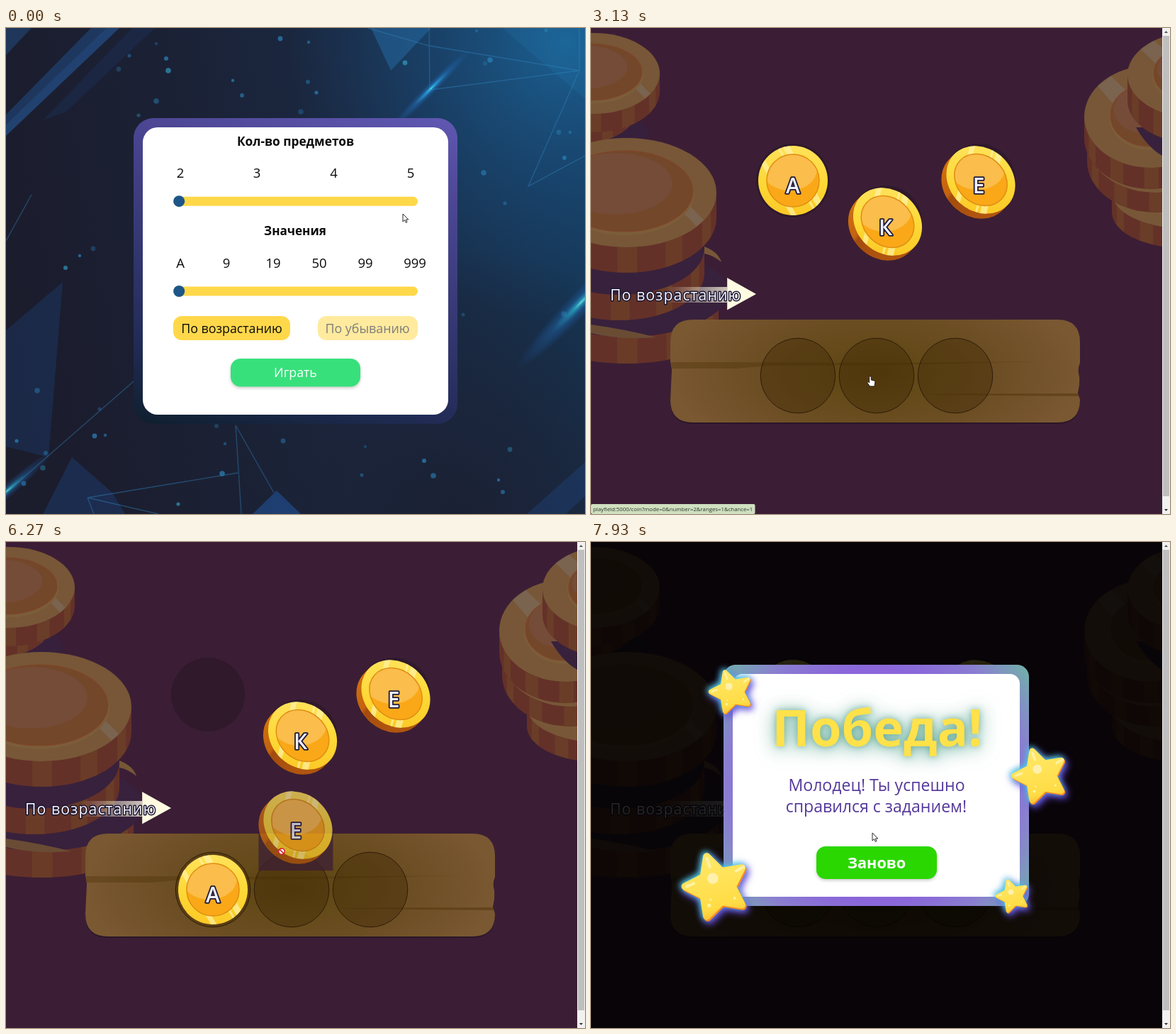
An HTML page that plays this animation: 817x685 px, repeating every 8 s.

```html
<!DOCTYPE html>
<html lang="ru">
<head>
<meta charset="utf-8">
<title>Игра с монетами</title>
<style>
html, body { margin: 0; width: 100%; height: 100%; overflow: hidden; background: #1b2135; }
svg { display: block; width: 817px; height: 685px; }
text { font-family: "Open Sans", "Noto Sans", sans-serif; }
.bold { font-weight: 700; }
.letter { font: 600 30px "Open Sans", "Noto Sans", sans-serif; fill: #eef0ff; stroke: #1d1a38; stroke-width: 3.6; paint-order: stroke; stroke-linejoin: round; text-anchor: middle; }
.win { filter: drop-shadow(0 0 5px rgba(20,120,95,.45)) drop-shadow(0 3px 13px rgba(20,130,100,.65)); }
.star { filter: drop-shadow(-2px -2px 4px #49d8e4) drop-shadow(3px 4px 5px #6647dc); }
.press { filter: drop-shadow(0 2px 2px rgba(0,0,0,.22)); }
</style>
</head>
<body>
<svg id="stage" viewBox="0 0 817 685" xmlns="http://www.w3.org/2000/svg"></svg>
<script>
const stage = document.getElementById('stage');

// markup helpers
const rect = (x, y, w, h, r, fill, more = '') =>
  `<rect x="${x}" y="${y}" width="${w}" height="${h}" rx="${r}" fill="${fill}" ${more}/>`;
const oval = (x, y, rx, ry, fill, more = '') =>
  `<ellipse cx="${x}" cy="${y}" rx="${rx}" ry="${ry}" fill="${fill}" ${more}/>`;
const path = (d, fill, more = '') => `<path d="${d}" fill="${fill}" ${more}/>`;
const label = (s, x, y, size, fill = '#0b0b0b', more = '') =>
  `<text x="${x}" y="${y}" font-size="${size}" fill="${fill}" text-anchor="middle" ${more}>${s}</text>`;
const stops = list => list.map(([o, c, a = 1]) => `<stop offset="${o}" stop-color="${c}" stop-opacity="${a}"/>`).join('');
const linear = (id, x1, y1, x2, y2, list) =>
  `<linearGradient id="${id}" gradientUnits="userSpaceOnUse" x1="${x1}" y1="${y1}" x2="${x2}" y2="${y2}">${stops(list)}</linearGradient>`;
const radial = (id, x, y, r, list, more = '') =>
  `<radialGradient id="${id}" gradientUnits="userSpaceOnUse" cx="${x}" cy="${y}" r="${r}" ${more}>${stops(list)}</radialGradient>`;

const homes = { A: [285, 215], K: [415.5, 274], E: [547, 215] };
const letters = { A: 'А', K: 'К', E: 'Е' };
const names = Object.keys(homes);
const slots = [[292, 490], [403, 490], [514, 490]];

// shine: angle of the pale streaks across the rim
function coinFace(id, x, y, rx, ry, irx, iry, turn, shine) {
  const spin = `transform="translate(${x} ${y}) rotate(${turn})"`;
  return `<clipPath id="${id}Rim"><ellipse rx="${rx}" ry="${ry}" ${spin}/></clipPath>
    <clipPath id="${id}In"><ellipse rx="${irx}" ry="${iry}" ${spin}/></clipPath>
    <g clip-path="url(#${id}Rim)">
      ${rect(-60, -60, 120, 120, 0, 'url(#gold)')}
      <g fill="#fff3a6" opacity=".7" transform="translate(${x} ${y}) rotate(${shine})">
        ${rect(-60, -20, 120, 9, 0, '#fff3a6')}${rect(-60, -7, 120, 3, 0, '#fff3a6')}${rect(-60, 20, 120, 7, 0, '#fff3a6')}
      </g>
    </g>
    <g ${spin}>${oval(0, 0, irx, iry, '#faa817')}</g>
    <g clip-path="url(#${id}In)">${oval(x - 5, y - 16, 39, 30, '#fbbd4b')}</g>
    <g ${spin}>${oval(0, 0, irx, iry, 'none', 'stroke="#e08d14" stroke-width="1.5"')}</g>`;
}

function tiltedCoin() {
  let side = '';
  for (let i = 7; i >= 1; i--) side += oval(3 - i, i - 1, 52, 44, 'url(#edge)', `transform="rotate(42 ${3 - i} ${i - 1})"`);
  return side + coinFace('tilt', 3, -1, 52, 44, 40, 33.5, 42, 105);
}

function starShape() {
  let d = '';
  for (let i = 0; i < 10; i++) {
    const a = Math.PI * (1 + i / 5), r = i % 2 ? 22 : 43;
    d += `${i ? 'L' : 'M'}${(r * Math.cos(a)).toFixed(1)} ${(r * Math.sin(a)).toFixed(1)}`;
  }
  d += 'Z';
  return path(d, '#f58a24', 'stroke="#f58a24" stroke-width="10" stroke-linejoin="round" transform="translate(1.5 2)"') +
    path(d, 'url(#starG)', 'stroke="url(#starG)" stroke-width="10" stroke-linejoin="round"') +
    oval(-5, -11, 7.5, 7.5, '#fff', 'opacity=".5"') +
    path('M-13 -38L-9 -27M37 -27L27 -21M-41 0L-31 -4', 'none', 'stroke="#fff6b5" stroke-width="4" stroke-linecap="round" opacity=".8"') +
    oval(-10, 26, 2.5, 2.5, '#fff3a0') + oval(25, 16, 2, 2, '#fff3a0') + oval(-8, 18, 1.5, 1.5, '#fff3a0');
}

const coinArt = n => `<g id="art${n}"><use href="#${n == 'A' ? 'flat' : 'slanted'}"/><text class="letter" y="18">${letters[n]}</text></g>`;

const defs = `<defs>
  ${linear('night', 0, 400, 817, 240, [[0, '#1b1c2c'], [.35, '#1b2135'], [.65, '#1a2942'], [1, '#153756']])}
  ${radial('glowTop', 790, 20, 390, [[0, '#1d6aa0', .8], [.45, '#1b5588', .5], [1, '#1b4c80', 0]])}
  ${radial('shadeLow', 640, 690, 380, [[0, '#1b2033', .95], [.4, '#1b2236', .7], [1, '#1b2236', 0]])}
  ${linear('frame', 180, 558, 317, 42, [[0, '#0f1f2d'], [.22, '#222c57'], [.78, '#4c4694'], [1, '#6058b3']])}
  ${radial('flareG', 0, 0, 1, [[0, '#7ffcf0'], [.12, '#2bb6d6', .85], [.45, '#2277c8', .4], [1, '#2066c0', 0]])}
  ${linear('gold', 0, -50, 0, 50, [[0, '#ffe25a'], [.55, '#fdd835'], [1, '#fcc826']])}
  ${linear('edge', -45, 0, 20, 50, [[0, '#d0700f'], [.55, '#c4620f'], [.62, '#a34b0e'], [1, '#b0550f']])}
  ${radial('wood', 401, 486, 290, [[0, '#5c4110'], [.3, '#654a1a'], [.65, '#6e4f26'], [1, '#7a5832']], 'gradientTransform="translate(0 253) scale(1 .48)"')}
  ${linear('shaft', 105, 0, 233, 0, [[0, '#fffbe2', 0], [.68, '#e8e0d0', .85], [.69, '#fffbe2'], [1, '#fffbe2']])}
  ${radial('prize', 402, 343, 275, [[0, '#8a63da'], [.6, '#8a66da'], [.78, '#8a7fd0'], [1, '#6fb5a6']])}
  ${linear('starG', 0, -40, 18, 48, [[0, '#ffe766'], [.75, '#ffdc45'], [1, '#fbb52f']])}
  <g id="flat">${coinFace('flat', 0, 0, 49, 49, 37, 37, 0, 60)}</g>
  <g id="slanted">${tiltedCoin()}</g>
  <g id="star">${starShape()}</g>
  ${names.map(coinArt).join('')}
</defs>`;

const flare = (x, y, len, thick, turn, alpha = 1) =>
  `<ellipse rx="1" ry="1" fill="url(#flareG)" opacity="${alpha}" transform="translate(${x} ${y}) rotate(${turn}) scale(${len} ${thick})"/>`;

function menuScene() {
  const dots = [212, 22, 226, 43, 229, 60, 174, 39, 159, 58, 320, 74, 333, 95, 212, 103, 187, 123, 387, 15, 427, 20, 426, 76,
    416, 118, 438, 91, 563, 49, 664, 4, 676, 50, 683, 45, 762, 3, 780, 147, 796, 147, 788, 183, 674, 204, 704, 247,
    123, 311, 104, 321, 84, 338, 44, 511, 132, 537, 125, 575, 140, 574, 56, 599, 52, 620, 15, 582, 25, 642, 309, 586,
    297, 561, 305, 628, 243, 671, 391, 582, 507, 590, 590, 610, 603, 631, 502, 630, 711, 594, 695, 637, 701, 654, 787, 403, 645, 404];
  let spots = '';
  for (let i = 0; i < dots.length; i += 2) {
    const k = i / 2, r = 2.2 + k * 7 % 5 * .4;
    spots += oval(dots[i], dots[i + 1], r, r, k % 6 == 2 ? '#35aad0' : '#2a7fb5', `opacity="${.35 + k * 3 % 4 * .13}"`);
  }
  const track = y => rect(236, y - 6.5, 345, 13, 6.5, '#ffd84a');
  const row = (words, xs, y) => words.map((w, i) => label(w, xs[i], y, 18.5)).join('');
  return rect(0, 0, 817, 685, 0, 'url(#night)') + rect(0, 0, 817, 685, 0, 'url(#glowTop)') + rect(0, 300, 817, 385, 0, 'url(#shadeLow)') +
    path('M0 122L120 0H160L0 152Z', '#22518c', 'opacity=".5"') +
    path('M0 136L142 0H160L0 152Z', '#2a62a4', 'opacity=".25"') +
    path('M0 38V0H36Z', '#24568f', 'opacity=".45"') +
    path('M52 130L178 0H210L85 118Z', '#1c3563', 'opacity=".35"') +
    path('M515 0L543 60L600 0Z', '#2671ad', 'opacity=".45"') +
    path('M700 0L817 100V0Z', '#2180b4', 'opacity=".18"') +
    path('M0 426L80 358L60 605L0 590Z', '#1b4073', 'opacity=".38"') +
    path('M93 605L150 655L168 685H52Z', '#1e4480', 'opacity=".4"') +
    path('M382 652L416 685H348Z', '#2456a0', 'opacity=".55"') +
    path('M817 612L735 685H790L817 660Z', '#20457e', 'opacity=".4"') +
    path('M597 0L598 88M510 0L597 25L809 60M809 0V60L737 223L817 180M809 60L600 87M0 300L36 235M0 655L180 498M115 662L327 627M324 560L332 685M324 560L378 655M115 662L124 685M115 662L215 685',
      'none', 'stroke="#3289c4" stroke-width="1.3" opacity=".42"') +
    spots + flare(600, 85, 78, 8, -45) + flare(600, 85, 26, 4, -45) + flare(812, 386, 130, 17, -46, .85) + flare(2, 652, 85, 10, -41, .8) +
    rect(180, 127, 457, 431, 28, 'url(#frame)') + rect(193, 140, 431, 405, 21, '#fff') +
    label('Кол-во предметов', 408.5, 166, 17.3, '#0b0b0b', 'class="bold"') +
    row(['2', '3', '4', '5'], [246, 354, 462.5, 571], 211) + track(244.3) +
    label('Значения', 408, 292, 17.1, '#0b0b0b', 'class="bold"') +
    row(['А', '9', '19', '50', '99', '999'], [246, 311, 377, 442, 507, 577], 337.5) + track(371) +
    `<circle id="knob" cy="244.2" r="8" fill="#1d5688"/>` + oval(244.2, 371, 8, 8, '#1d5688') +
    rect(236, 406, 165, 34, 12, '#ffd84a') + label('По возрастанию', 318.5, 429.5, 17.8) +
    `<g opacity=".53">${rect(440, 406, 141, 34, 12, '#ffd84a')}${label('По убыванию', 510, 429.5, 17.8)}</g>` +
    rect(317, 466, 183, 39.5, 14, '#38e07b', 'class="press"') + label('Играть', 408.5, 492, 17.8, '#fff');
}

// one dimmed coin of the background piles; without irx its face lies in shadow
function slab(x, y, rx, ry, h, irx, iry) {
  const at = a => `${x + rx * Math.sin(a)} ${y + ry * Math.cos(a)}`;
  const side = `M${x - rx} ${y}v${h}a${rx} ${ry} 0 0 0 ${2 * rx} 0v${-h}z`;
  let ribs = '';
  for (let a = -1.2; a < 1.3; a += .55)
    ribs += path(`M${at(a)}L${at(a + .22)}v${h}L${at(a)}v${h}z`.replace(/L([^Lv]+)v([\d.]+)z$/, (m, p, d) => {
      const [px, py] = p.split(' ').map(Number);
      return `L${px} ${py + +d}z`;
    }), '#6c4128', 'opacity=".75"');
  let out = path(side, '#643128') + ribs + oval(x, y, rx, ry, irx ? '#775737' : '#38213c');
  if (irx) {
    out += path(`M${x + rx * .62} ${y + ry * .1}L${x + rx * .86} ${y + ry * .5}L${x + rx * .78} ${y + ry * .62}L${x + rx * .54} ${y + ry * .22}zM${x - rx * .8} ${y - ry * .6}L${x - rx * .6} ${y - ry * .8}L${x - rx * .2} ${y - ry * .3}L${x - rx * .4} ${y}z`, '#7d685a', 'opacity=".7"') +
      oval(x - 3, y + 1, irx + 2, iry + 2, '#7b5d39') +
      oval(x - 3, y - 2, irx, iry, '#734729', 'stroke="#80452b" stroke-width="1.2"') +
      oval(x - irx * .15, y - iry * .22, irx * .82, iry * .76, '#754c38');
  }
  return out;
}

function gameScene() {
  const holes = Object.values(homes).map(([x, y]) => oval(x, y, 52, 52, '#2f192b')).join('');
  const cups = slots.map(([x, y]) => oval(x, y, 52.8, 52.8, '#3a2100', 'fill-opacity=".34" stroke="#2e1c08" stroke-width="1"')).join('');
  const board = 'M144 411H658Q690 411 690 443V472Q686 482 689 491Q690 503 687 514L690 524Q690 556 658 556H144Q112 556 112 524L114 482L112 470V443Q112 411 144 411Z';
  const coin = n => `<use id="coin${n}" href="#art${n}"/>`;
  const ghost = n => `<g id="ghost${n}" opacity=".74">${rect(-52.5, -52, 105, 115, 0, '#3b1e35')}<use href="#art${n}"/></g>`;
  return rect(0, 0, 817, 685, 0, '#3b1e35') +
    path('M62 120L84 150L70 160H0V130Z', '#37203c') +
    slab(-20, 95, 82, 45, 24) + slab(3, 64, 94, 57, 26, 72, 40) +
    slab(50, 385, 130, 50, 38) + oval(60, 372, 133, 60, '#38213c') +
    path('M0 418Q50 425 92 436Q40 440 0 430Z', '#6a4c35') + path('M160 308Q180 316 184 330Q172 320 160 318Z', '#775737') +
    slab(40, 310, 120, 66, 36) + slab(50, 232, 127, 77, 36, 97, 57) +
    slab(835, 232, 100, 50, 28, 60, 30) + slab(797, 160, 97, 72, 28, 56, 44) +
    slab(790, 125, 94, 72, 30, 54, 44) + path('M769 140Q785 168 806 180V140Z', '#38213c') +
    slab(850, 66, 93, 60, 36, 53, 38) + holes +
    path('M105 365H192V352L233 375L192 397.5V387H105Z', 'url(#shaft)') +
    `<text x="27" y="384" font-size="21.2" letter-spacing="1.1" fill="#f6f4ff" stroke="#1b1730" stroke-width="3" paint-order="stroke" stroke-linejoin="round">По возрастанию</text>` +
    path(board, '#1d0f1c', 'opacity=".5" transform="translate(0 2)"') + path(board, 'url(#wood)') +
    path('M113 471H205L420 472L640 470L420 475L250 476L205 480H114Z', '#4e3308', 'opacity=".4"') +
    path('M455 516L688 515V519L580 518Z', '#4e3308', 'opacity=".5"') +
    cups + names.map(coin).join('') + names.map(ghost).join('');
}

function winScene() {
  const star = (x, y, s) => `<g class="star"><use href="#star" transform="translate(${x} ${y}) scale(${s})"/></g>`;
  return rect(0, 0, 806, 685, 0, '#000', 'opacity=".85"') +
    rect(187, 173, 431, 340, 17, 'url(#prize)') + rect(200, 186, 405, 314, 14, '#fff') +
    label('Победа!', 404, 288, 72, '#ffe14a', 'class="bold win"') +
    label('Молодец! Ты успешно', 403, 351, 23.1, '#55399a') +
    label('справился с заданием!', 402.5, 381, 23.1, '#55399a') +
    rect(318, 429, 170, 46, 13, '#2bd700', 'class="press"') + label('Заново', 403, 460, 21.7, '#fff', 'class="bold"') +
    star(198, 211, .67) + star(634, 329.5, .85) + star(177, 485.5, 1.03) + star(595, 499, .51);
}

const bar = rect(806, 0, 11, 685, 0, '#f1f1f1') + rect(807, 11, 9, 649, 0, '#bfbfbf') +
  path('M809 7L811.5 4L814 7Z', '#555') + path('M809 678L811.5 681L814 678Z', '#333');

const arrow = 'M0 0V11L2.6 8.6L4.3 12.4L6 11.6L4.4 8H7.8Z';
const ink = 'stroke="#111" stroke-width=".9" stroke-linejoin="round"';
const pointers = {
  arrow: path(arrow, '#fff', ink),
  resize: path('M-7 0L-3.5 -3.5V-1.2H3.5V-3.5L7 0L3.5 3.5V1.2H-3.5V3.5Z', '#fff', ink),
  hand: path('M0 0C1 0 1.3 .6 1.3 1.4V5L6 6.2C7 6.6 7 7.5 6.8 9L6 14H-.5L-4 9.2C-4.4 8.2 -3 7.4 -2.2 8.2L-1.3 9V1.4C-1.3 .6 -1 0 0 0Z', '#fff', ink),
  copy: path(arrow, '#fff', ink) + rect(6.5, 12, 6, 6, 0, '#fff', ink) + path('M8 15H11M9.5 13.5V16.5', 'none', 'stroke="#111" stroke-width=".8"'),
  banned: oval(0, 0, 4.2, 4.2, '#fff', 'stroke="#d3202f" stroke-width="1.5"') + path('M-3 -3L3 3', 'none', 'stroke="#d3202f" stroke-width="1.5"')
};

stage.innerHTML = defs + `<g id="menu">${menuScene()}</g><g id="game">${gameScene()}</g><g id="win">${winScene()}</g><g id="bar">${bar}</g>` +
  `<g id="status">${rect(0, 671, 231.5, 14, 2, '#cfe0c0')}<text x="3" y="681" font-size="7.8" fill="#2c3328">playfield:5000/coin?mode=0&amp;number=2&amp;ranges=1&amp;chance=1</text></g>` +
  Object.entries(pointers).map(([k, art]) => `<g id="p-${k}">${art}</g>`).join('');

const el = id => document.getElementById(id);
const show = (id, on) => { el(id).style.display = on ? '' : 'none'; };
const move = (id, x, y) => el(id).setAttribute('transform', `translate(${x} ${y})`);

// pointer path: time, x, y
const trail = [
  [0, 560, 262], [330, 330, 335], [470, 242, 352], [600, 297, 360], [733, 297, 360],
  [1000, 325, 320], [1270, 350, 268], [1467, 382, 244], [1600, 453, 244],
  [1867, 385, 244], [2067, 371, 244], [2200, 371, 244], [2400, 478, 355], [2600, 394, 491], [3333, 394, 491],
  [3600, 540, 440], [3800, 589, 330], [4000, 440, 262], [4200, 314, 241], [4333, 301, 238], [4467, 301, 238],
  [4600, 287, 241], [4733, 287, 241], [5200, 285, 447], [5333, 284, 490], [5600, 420, 500],
  [5800, 600, 400], [5900, 625, 300], [6033, 527, 251], [6067, 527, 251], [6267, 389, 436], [6467, 392, 492], [6533, 392, 492],
  [6733, 480, 380], [6933, 405, 275], [7000, 405, 275], [7333, 499, 497], [7600, 499, 497],
  [7733, 524, 468], [7933, 397, 410], [8000, 397, 410]
];

function slope(i, axis) {
  const a = trail[i - 1], b = trail[i], c = trail[i + 1];
  if (!a || !c || (a[1] == b[1] && a[2] == b[2]) || (b[1] == c[1] && b[2] == c[2])) return 0;
  return (c[axis] - a[axis]) / (c[0] - a[0]);
}

function pointerAt(t) {
  let i = trail.findIndex(k => k[0] > t) - 1;
  if (i < 0) i = trail.length - 2;
  const a = trail[i], b = trail[i + 1], d = b[0] - a[0], u = (t - a[0]) / d, v = 1 - u;
  return [1, 2].map(n => a[n] * (1 + 2 * u) * v * v + slope(i, n) * d * u * v * v +
    b[n] * u * u * (3 - 2 * u) - slope(i + 1, n) * d * u * u * v);
}

const drags = [
  { name: 'A', from: 4740, to: 5390, grab: [287, 241], slot: 0 },
  { name: 'E', from: 6070, to: 6590, grab: [527, 251], slot: 1 },
  { name: 'K', from: 7010, to: 7390, grab: [405, 275] }
];

function pointerKind(t, x, y, dragging) {
  if (dragging) return slots.some(([sx, sy]) => Math.hypot(x - sx, y - sy) < 54) ? 'copy' : 'banned';
  if (t < 3130 && x > 236 && x < 581 && Math.abs(y - 244) < 6.5) return 'resize';
  if (t > 2300 && t < 3390 && y > 466) return 'hand';
  return 'arrow';
}

function draw(t) {
  const inGame = t >= 3130, won = t >= 7530;
  const [x, y] = pointerAt(t);
  show('menu', !inGame);
  show('game', inGame);
  show('bar', inGame);
  show('win', won);

  const k = Math.min(1, Math.max(0, (t - 1867) / 133));
  el('knob').setAttribute('cx', 244.2 + 109.7 * k * k * (3 - 2 * k));

  show('status', t >= 2795 && t < 3395);
  el('status').setAttribute('opacity', t < 2860 ? .5 : 1);

  let dragging = false;
  for (const d of drags) {
    const held = t >= d.from && t < d.to, home = homes[d.name];
    dragging = dragging || held;
    show('ghost' + d.name, held);
    if (held) move('ghost' + d.name, home[0] + x - d.grab[0], home[1] + y - d.grab[1]);
    const placed = t >= d.to && !won && d.slot !== undefined;
    move('coin' + d.name, ...(placed ? slots[d.slot] : home));
  }

  const kind = pointerKind(t, x, y, dragging);
  for (const p in pointers) show('p-' + p, p == kind);
  move('p-' + kind, x, y);
}

// the picture advances fifteen times a second
const step = 1000 / 15;
const start = performance.now();
function tick(now) {
  const t = Math.max(0, now - start) % 8000;
  draw(Math.min(7999, Math.floor((t + 5) / step) * step + .5));
  requestAnimationFrame(tick);
}
draw(0);
requestAnimationFrame(tick);
</script>
</body>
</html>
```
